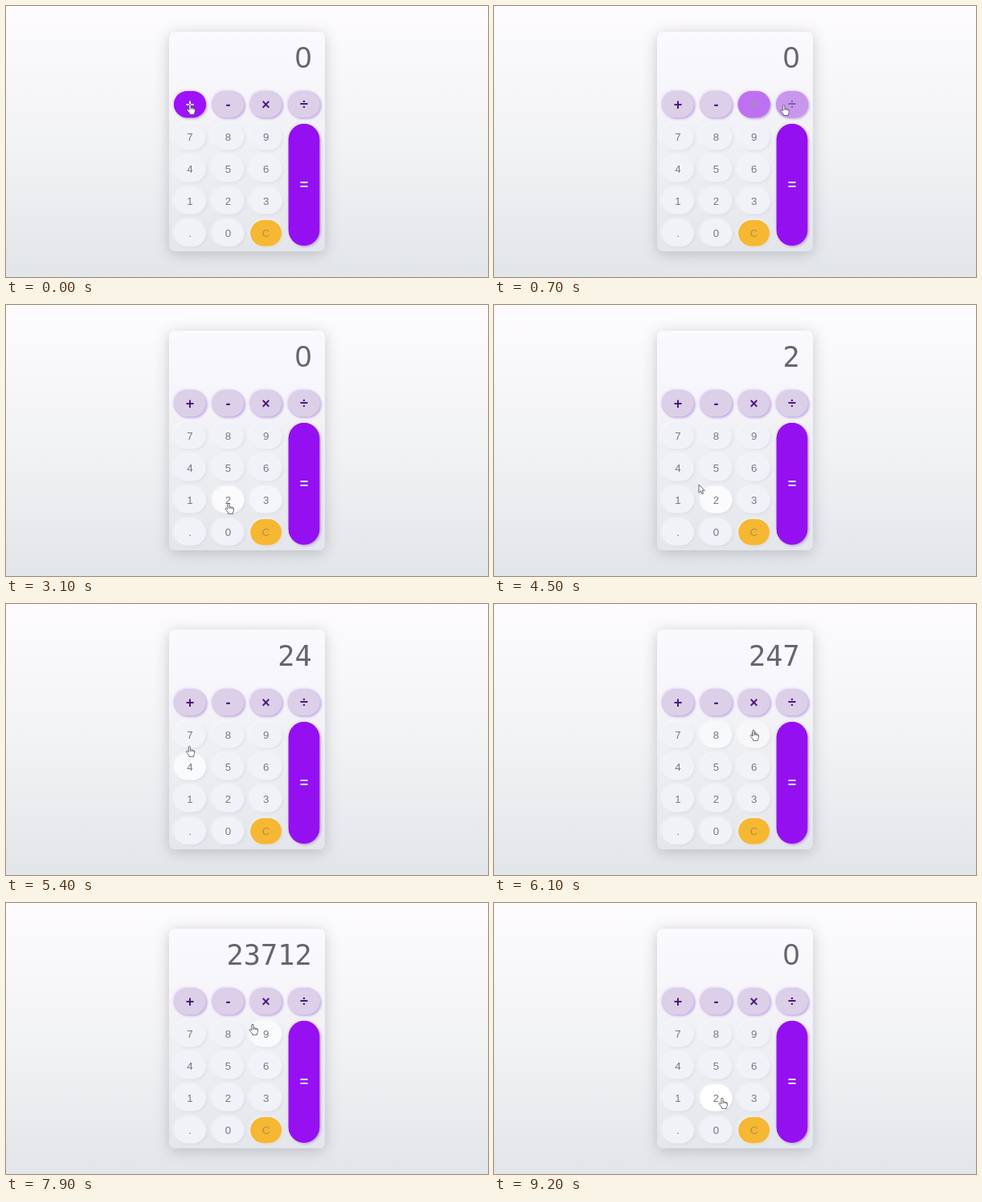
These frames come from a looping animation (600x338 px, 9300 ms). An HTML page with a canvas:

```html
<!DOCTYPE html>
<html lang="en">
<head>
<meta charset="utf-8">
<title>Calculator</title>
<style>
html, body { margin: 0; width: 100%; height: 100%; overflow: hidden; background: #f2f2f5; }
canvas { display: block; width: 600px; height: 338px; }
</style>
</head>
<body>
<canvas id="stage"></canvas>
<script>
const W = 600, H = 338, LOOP = 9300, STEP = 100, FADE = 200;
const canvas = document.getElementById('stage');
const ctx = canvas.getContext('2d');
const dpr = window.devicePixelRatio || 1;
canvas.width = W * dpr;
canvas.height = H * dpr;
ctx.scale(dpr, dpr);

const SANS = '"Liberation Sans", Arial, sans-serif';
const MONO = '"DejaVu Sans Mono", monospace';

// Colours as [r, g, b]; the second of each pair is the hover state.
const STYLES = {
  num: { bg: [[241, 242, 247], [255, 255, 255]], fg: [[116, 120, 131], [116, 120, 131]],
         font: '13.3px ' + SANS, drop: 4.8, shadow: 'rgba(205,208,222,.45)', glow: 'rgba(255,255,255,.6)' },
  op: { bg: [[220, 207, 232], [157, 18, 248]], fg: [[76, 22, 128], [255, 255, 255]],
        font: 'bold 18px ' + SANS, drop: 6.1, shadow: 'rgba(178,140,220,.75)', glow: 'rgba(225,205,245,.9)' },
  eq: { bg: [[149, 16, 240], [155, 18, 247]], fg: [[246, 236, 255], [255, 255, 255]],
        font: 'bold 18px ' + SANS, drop: 6.1, shadow: 'rgba(178,140,220,.8)', glow: 'rgba(225,205,245,.6)' },
  clear: { bg: [[246, 183, 50], [251, 201, 50]], fg: [[181, 143, 70], [255, 250, 235]],
           font: '13.3px ' + SANS, drop: 4.8, shadow: 'rgba(225,205,160,.45)', glow: 'rgba(255,255,255,.6)' }
};

const COLS = [229, 276.5, 323.6, 371], ROWS = [122.7, 163, 203, 243, 283.2];
const keys = [];
['+-×÷', '789', '456', '123', '.0C'].forEach((line, r) => {
  [...line].forEach((label, c) => {
    const kind = r === 0 ? 'op' : label === 'C' ? 'clear' : 'num';
    const w = kind === 'clear' ? 38.5 : 40, h = kind === 'clear' ? 32 : 33;
    keys.push({ label, kind, cx: COLS[c], cy: ROWS[r], w, h });
  });
});
keys.push({ label: '=', kind: 'eq', cx: 371, cy: 223, w: 38.5, h: 152 });

// Pointer route: time, x, y
const ROUTE = [
  [0, 229, 122], [300, 277, 124], [500, 324, 124], [750, 370, 123], [1000, 372, 175],
  [1200, 368, 250], [1400, 332, 282], [1700, 306, 283], [2000, 232, 284], [2200, 230, 240],
  [2500, 232, 160], [2700, 322, 165], [2800, 364, 212], [3000, 282, 248], [3100, 277, 247],
  [4100, 277, 247], [4500, 255, 224], [4800, 229, 203], [5200, 229, 203], [5500, 228, 164],
  [5800, 228, 164], [6100, 323, 157], [6300, 324, 122], [6400, 324, 122], [6600, 323, 160],
  [6850, 323, 160], [7100, 324, 200], [7300, 324, 200], [7500, 370, 215], [7650, 371, 215],
  [7900, 307, 151], [8150, 234, 165], [8350, 240, 240], [8600, 322, 282], [8850, 322, 282],
  [9000, 289, 252], [9200, 284, 243]
];

const SHOWN = [[0, '0'], [4000, '2'], [5000, '24'], [5600, '247'], [6600, '9'],
               [7200, '96'], [7600, '23712'], [8700, '0']];

const mix = (a, b, k) => a + (b - a) * k;
const blend = ([a, b], k) => `rgb(${a.map((v, i) => Math.round(mix(v, b[i], k)))})`;

function pointerAt(t) {
  const i = ROUTE.findIndex(p => p[0] > t);
  if (i < 0) return ROUTE[ROUTE.length - 1].slice(1);
  if (i === 0) return ROUTE[0].slice(1);
  const a = ROUTE[i - 1], b = ROUTE[i], k = (t - a[0]) / (b[0] - a[0]);
  return [mix(a[1], b[1], k), mix(a[2], b[2], k)];
}

function inside(key, [x, y]) {
  return Math.abs(x - key.cx) <= key.w / 2 && Math.abs(y - key.cy) <= key.h / 2;
}

// Share of the fade window during which the pointer was over the key
function hoverLevel(key, t) {
  const n = 10;
  let sum = 0;
  for (let i = 0; i < n; i++) {
    if (inside(key, pointerAt(Math.max(0, t - i * FADE / n)))) sum++;
  }
  return sum / n;
}

function pill(x, y, w, h, r, fill) {
  ctx.beginPath();
  ctx.roundRect(x, y, w, h, r);
  ctx.fillStyle = fill;
  ctx.fill();
}

function shade(color, blur, dx, dy) {
  ctx.shadowColor = color;
  ctx.shadowBlur = blur * dpr;
  ctx.shadowOffsetX = dx * dpr;
  ctx.shadowOffsetY = dy * dpr;
}

function gradient(y0, y1, stops) {
  const g = ctx.createLinearGradient(0, y0, 0, y1);
  stops.forEach(([at, color]) => g.addColorStop(at, color));
  return g;
}

function drawBody() {
  ctx.fillStyle = gradient(0, H, [[0, '#fdfbfd'], [0.5, '#f2f3f5'], [1, '#e2e5e9']]);
  ctx.fillRect(0, 0, W, H);
  ctx.save();
  shade('rgba(60,60,75,.26)', 18, 0, 3);
  pill(203, 32, 194, 274, 7,
    gradient(32, 306, [[0, '#faf9fd'], [0.25, '#f7f6fb'], [0.5, '#eff0f4'], [1, '#e3e6ea']]));
  ctx.restore();
}

function drawKey(key, t) {
  const s = STYLES[key.kind], k = hoverLevel(key, t);
  const box = [key.cx - key.w / 2, key.cy - key.h / 2, key.w, key.h, Math.min(key.w, key.h) / 2];
  const fill = blend(s.bg, k);
  ctx.save();
  shade(s.glow, 3, -1, -1);
  pill(...box, fill);
  shade(s.shadow, 3, 1.5, 1.5);
  pill(...box, fill);
  ctx.restore();
  ctx.font = key.kind === 'clear' && k > 0.5 ? 'bold ' + s.font : s.font;
  ctx.textAlign = 'center';
  ctx.fillStyle = blend(s.fg, k);
  ctx.fillText(key.label, key.cx, key.cy + s.drop);
}

function drawDisplay(t) {
  const text = SHOWN.filter(([at]) => at <= t).pop()[1];
  ctx.textAlign = 'center';
  ctx.fillStyle = '#66656c';
  [...text].reverse().forEach((d, i) => {
    // The plain zero comes from a face without a dot in it.
    ctx.font = d === '0' ? '37px "Noto Sans", "Open Sans", sans-serif' : '35.2px ' + MONO;
    ctx.fillText(d, 370 - i * 21.2, 77);
  });
}

const ARROW = new Path2D('M0 0V10.2L2.4 8L4 11.8L5.6 11.1L4 7.4H7.2Z');
const HAND = new Path2D('M-1.1 .9Q0 -.6 1.1 .9V5Q2.2 4.2 3.1 5.3Q4.3 4.7 5 5.8Q6.3 5.5 6.4 7' +
  'V9.3Q6.3 10.8 5.4 11.7V13.3H-.4V12Q-2.4 9.8 -3.8 7.6Q-4 6.2 -2.6 6.4L-1.1 7.9Z');
const KNUCKLES = new Path2D('M1.1 5V7M3.1 5.3V7.2M5 5.8V7.4');

function drawPointer(t) {
  const p = pointerAt(t), over = keys.some(key => inside(key, p));
  ctx.save();
  ctx.translate(...p);
  ctx.lineWidth = 0.8;
  ctx.lineJoin = 'round';
  ctx.fillStyle = '#fff';
  ctx.strokeStyle = '#45454d';
  const shape = over ? HAND : ARROW;
  ctx.fill(shape);
  ctx.stroke(shape);
  if (over) ctx.stroke(KNUCKLES);
  ctx.restore();
}

function draw(t) {
  drawBody();
  drawDisplay(t);
  keys.forEach(key => drawKey(key, t));
  drawPointer(t);
}

const start = performance.now();
function frame() {
  const t = (performance.now() - start) % LOOP;
  draw(Math.floor(t / STEP) * STEP);
  requestAnimationFrame(frame);
}
frame();
</script>
</body>
</html>
```
